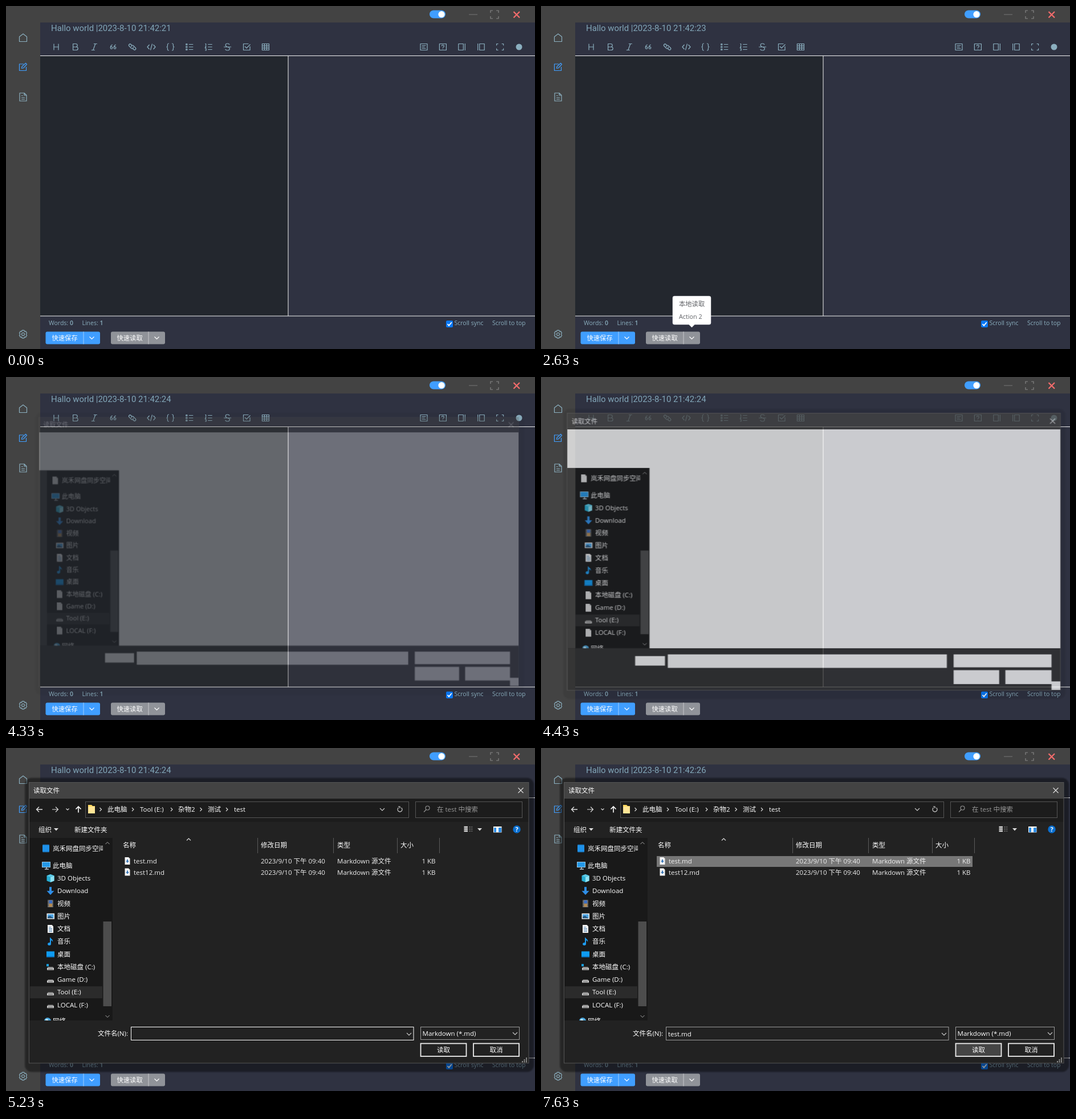
An HTML page for the animation above (8000 ms loop, 928 by 603 pixels).

```html
<!DOCTYPE html>
<html lang="zh-CN">
<head>
<meta charset="utf-8">
<title>Editor</title>
<style>
html, body { margin: 0; width: 100%; height: 100%; overflow: hidden; background: #2f3241; }
svg { display: block; }
text { white-space: pre; }
#stage { font: 11.5px 'Open Sans', 'Noto Sans CJK SC', 'Noto Sans CJK', sans-serif; }
.title { font: 14.93px Roboto, sans-serif; fill: #82a6b8; }
.foot { font-size: 10.5px; fill: #8bafbf; }
.btn { font-size: 11.3px; font-weight: 500; fill: #fff; }
.line { fill: none; stroke: #8bafbf; stroke-width: 1.2; stroke-linejoin: round; }
.thin { fill: none; stroke: #ddd; stroke-width: 1.1; }
.box { fill: none; stroke: #555; }
.mid { text-anchor: middle; }
.end { text-anchor: end; }

#stage [class*="a-"] { animation: 8s step-end infinite; }
#stage .a-clock { animation-name: clock; }
#stage .a-main { animation-name: main; animation-timing-function: linear; }
#stage .a-arrow { animation-name: arrow; animation-timing-function: linear; }
#stage .a-menu { animation-name: menu; animation-timing-function: linear; }
#stage .a-item { animation-name: item; }
#stage .a-itemtext { animation-name: itemtext; }
#stage .a-dialog { animation-name: dialog; transform-origin: 479px 307px; }
#stage .a-shadow { animation-name: shadow; }
#stage .a-body { animation-name: body; }
#stage .a-early { animation-name: early; }
#stage .a-late { animation-name: late; }
#stage .a-folder { animation-name: folder; }
#stage .a-row { animation-name: row; }
#stage .a-caret { animation-name: caret; }
#stage .a-name { animation-name: name; }
#stage .a-field { animation-name: field; }
#stage .a-filter { animation-name: filter; }
#stage .a-open { animation-name: open; animation-timing-function: linear; }

@keyframes clock {
  0% { transform: none; }
  15.3% { transform: translateY(-30px); }
  32.8% { transform: translateY(-60px); }
  50.3% { transform: translateY(-90px); }
  67.8% { transform: translateY(-120px); }
  85.3%, 100% { transform: translateY(-150px); }
}
@keyframes main {
  0%, 12.8% { fill: #909399; }
  14.1%, 22.8% { fill: #a6a9ad; }
  24.1%, 100% { fill: #909399; }
}
@keyframes arrow {
  0%, 9.1% { fill: #909399; }
  10.3%, 12.8% { fill: #a6a9ad; }
  14.1%, 22.8% { fill: #909399; }
  24.1%, 31.5% { fill: #a6a9ad; }
  32.8%, 100% { fill: #909399; }
}
@keyframes menu {
  0%, 12% { opacity: 0; }
  15% { opacity: .6; }
  17.8%, 26% { opacity: 0; }
  31.6%, 43.5% { opacity: 1; }
  47.8%, 100% { opacity: 0; }
}
@keyframes item { 0% { fill: #fff; } 41.6%, 100% { fill: #ecf5ff; } }
@keyframes itemtext { 0% { fill: #606266; } 41.6%, 100% { fill: #409eff; } }
@keyframes dialog {
  0% { opacity: 0; transform: scale(.95); }
  54.1% { opacity: .3; transform: scale(.96); }
  55.3% { opacity: .75; transform: scale(.987); }
  56.6% { opacity: .95; transform: scale(.997); }
  57.8%, 100% { opacity: 1; transform: none; }
}
@keyframes shadow { 0% { opacity: .12; } 56.6% { opacity: .3; } 57.8%, 100% { opacity: .42; } }
@keyframes body { 0% { fill: #313131; } 56.6%, 100% { fill: #222; } }
@keyframes early { 0% { opacity: 1; } 56.6%, 100% { opacity: 0; } }
@keyframes late { 0% { opacity: 0; } 56.6%, 100% { opacity: 1; } }
@keyframes folder { 0% { fill: #777; } 65.3%, 100% { fill: #fff; } }
@keyframes row { 0% { fill: #4d4d4d00; } 69.1% { fill: #4d4d4d; } 77.8%, 100% { fill: #777; } }
@keyframes caret { 0% { opacity: 0; } 67.8% { opacity: 1; } 75.3%, 100% { opacity: 0; } }
@keyframes name { 0% { opacity: 0; } 77.8%, 100% { opacity: 1; } }
@keyframes field { 0% { stroke: #fff; } 85.3% { stroke: #c4c4c4; } 95.3%, 100% { stroke: #9b9b9b; } }
@keyframes filter { 0% { stroke: #9b9b9b; } 89.1% { stroke: #ccc; } 91.6%, 100% { stroke: #9b9b9b; } }
@keyframes open { 0%, 90.3% { fill: #222; } 92.8%, 100% { fill: #454545; } }
</style>
</head>
<body>
<svg id="stage" width="928" height="603" viewBox="0 0 928 603">
  <defs>
    <clipPath id="titleline"><rect x="70" y="30" width="300" height="20"/></clipPath>
    <clipPath id="tree"><rect x="41" y="158" width="129" height="321"/></clipPath>
    <filter id="soft" x="-5%" y="-5%" width="110%" height="110%"><feGaussianBlur stdDeviation="1.2"/></filter>
    <g id="down"><path d="M-4-2L0 2 4-2" fill="none" stroke="currentColor" stroke-width="1.1"/></g>
    <g id="next"><path d="M-1.5-3L1.5 0-1.5 3" class="thin"/></g>
    <g id="md"><path d="M-4.5-6.5H2L4.5-4V6.5H-4.5z" fill="#f4f4f4"/><path d="M-1-2.5H1V0H3L0 3.5-3 0H-1z" fill="#3a78b8"/></g>
    <g id="doc"><path d="M-5-7H2L5-4V7H-5z" fill="#ddd"/><path d="M2-7V-4H5" fill="#aaa"/></g>
    <g id="drive"><path d="M-4 0H4L6 2H-6z" fill="#888"/><path d="M-6 2H6V5.500H-6z" fill="#ddd"/><path d="M-4.500 3.800H4.500" stroke="#444"/></g>
    <g id="sysdrive"><use href="#drive"/><rect x="-7" y="-5" width="4" height="4" fill="#19a5ee"/></g>
    <g id="cloud"><rect x="-6" y="-6.5" width="12" height="13" rx="1" fill="#1e90e8"/></g>
    <g id="pc"><rect x="-6.5" y="-6" width="14" height="9" fill="#2499e8" stroke="#9ccbea"/><path d="M-2 6.5H5M1 3V6" stroke="#b9c6d0" stroke-width="1.5"/></g>
    <g id="cube"><path d="M0-7L6.5-4.5V4.5L0 7-6.5 4.5V-4.5z" fill="#27aed3"/><path d="M0-2L6.5-4.5V4.5L0 7z" fill="#8fe2f3"/><path d="M0-7L6.5-4.5 0-2-6.5-4.5z" fill="#5cc8e4"/></g>
    <g id="save"><path d="M-2-7H2V0H6.5L0 7-6.5 0H-2z" fill="#2f8fe8"/></g>
    <g id="film"><path d="M-5-6.5H5V6.5H-5z" fill="#777"/><path d="M-2.5-5.5H3V-.5H-2.5z" fill="#3d6fc4"/><path d="M-2.5.5H3V5.5H-2.5z" fill="#b58b52"/><path d="M-4-6V6.5M4.2-6V6.5" stroke="#222" stroke-dasharray="1.5 1.5"/></g>
    <g id="photo"><path d="M-6.5-5H7V5H-6.5z" fill="#eee"/><path d="M-5-3.5H5.5V3.5H-5z" fill="#4ea6e6"/><path d="M-5 3.5V1L-1-1 5.5 3.5z" fill="#26577f"/></g>
    <g id="page"><path d="M-5-7H2.5L5-4.5V7H-5z" fill="#f2f2f2"/><path d="M-3-3H1M-3-.5H3M-3 2H3M-3 4.5H3" stroke="#4b80b0"/></g>
    <g id="note"><path d="M0-7C1-4 5-4 4 1 3.5-1.5 2-2 1-2V4A3 2.5 0 1 1-1 2V-7z" fill="#1e9cf0"/></g>
    <g id="desk"><path d="M-7-5H7V5.5H-7z" fill="#0f9bf2"/><path d="M-7 3.5H7V5.5H-7z" fill="#0a75c2"/></g>
    <g id="globe"><circle r="6" fill="#4aa7dd"/><path d="M-4-3Q0-5 1-2T-3 1z" fill="#c5e6f5"/></g>
  </defs>

  <!-- window frame -->
  <rect width="928" height="603" fill="#434343"/>
  <rect x="60" y="29" width="868" height="574" fill="#2f3241"/>
  <rect x="743" y="7.5" width="28" height="14" rx="7" fill="#409eff"/>
  <circle cx="764" cy="14.7" r="5.6" fill="#fff"/>
  <path d="M812 15H827" stroke="#777"/>
  <path d="M850 12V8H854M860 8H864V12M864 18V22H860M854 22H850V18" fill="none" stroke="#858585" stroke-width="1.2"/>
  <path d="M890.5 10L901 20.5M901 10L890.5 20.5" stroke="#f56c6c" stroke-width="2.2"/>

  <g class="line">
    <path transform="translate(30 56)" d="M-6.5 6.5V-2L0-7 6.5-2V6.5z"/>
    <path transform="translate(30 107)" style="stroke:#409eff" d="M1-5H-6.5V6.5H5.5V0M-2.5 2.5L-2-.5 4.5-6.5 6.5-4.5.5 2z"/>
    <path transform="translate(30 160)" d="M-6-7H2L6-3V7H-6zM2-7V-3H6M-3-2.5H-.5M-3 1H3M-3 4H3"/>
    <g transform="translate(30 577)"><path d="M-1.8-6.8H1.8L2.5-4.8 4.7-5.1 6.6-2 5.2 0 6.6 2 4.7 5.1 2.5 4.8 1.8 6.8H-1.8L-2.5 4.8-4.7 5.1-6.6 2-5.2 0-6.6-2-4.7-5.1-2.5-4.8z"/><circle r="2.5"/></g>
  </g>

  <g class="title" clip-path="url(#titleline)"><g class="a-clock" id="clock"></g></g>

  <!-- toolbar -->
  <g class="line" id="tools"></g>
  <circle cx="900" cy="72" r="5.5" fill="#8bafbf"/>

  <rect x="60" y="88" width="435" height="457" fill="#23272e"/>
  <path d="M60 87.5H928M60 545H928M495 88V545" stroke="#f2f2f2"/>

  <!-- footer -->
  <g class="foot">
    <text x="75" y="561">Words: <tspan font-weight="600">0</tspan></text>
    <text x="133.5" y="561">Lines: <tspan font-weight="600">1</tspan></text>
    <text x="786.5" y="561">Scroll sync</text>
    <text x="853" y="561">Scroll to top</text>
  </g>
  <rect x="772" y="553" width="12" height="12" rx="2" fill="#0a78f5"/>
  <path d="M774.5 559L777 561.8 781.8 556" fill="none" stroke="#fff" stroke-width="1.8"/>

  <g class="btn" color="#fff">
    <rect x="69.5" y="572.5" width="95.5" height="22" rx="3" fill="#409eff"/>
    <path d="M136 572.5V594.5" stroke="#a0cfff"/>
    <text x="80.5" y="587.5">快速保存</text>
    <use href="#down" x="150.5" y="583.5"/>
    <path class="a-main" d="M187 572.5H250V594.5H187Q184 594.5 184 591.5V575.5Q184 572.5 187 572.5z"/>
    <path class="a-arrow" d="M250 572.5H276Q279 572.5 279 575.5V591.5Q279 594.5 276 594.5H250z"/>
    <path d="M250 572.5V594.5" stroke="#c8c9cc"/>
    <text x="194.5" y="587.5">快速读取</text>
    <use href="#down" x="264.5" y="583.5"/>
  </g>

  <g class="a-menu">
    <path d="M234 510H295Q298 510 298 513V557Q298 560 295 560H269.5L264.5 565 259.5 560H234Q231 560 231 557V513Q231 510 234 510z" fill="#fff" stroke="#e4e7ed" stroke-width=".5"/>
    <rect class="a-item" x="231" y="513" width="67" height="22"/>
    <text class="a-itemtext" x="242" y="528" font-size="11.3">本地读取</text>
    <text x="242" y="550" font-size="10.8" fill="#606266">Action 2</text>
  </g>

  <!-- file dialog -->
  <g class="a-dialog" fill="#fff">
    <rect class="a-shadow" x="33" y="52.5" width="893" height="517" rx="12" fill="#000" filter="url(#soft)"/>
    <rect class="a-body" x="41" y="61" width="876" height="493"/>
    <rect x="41" y="61" width="876" height="28" fill="#434343"/>
    <rect x="41" y="89" width="876" height="41" fill="#1c1c1c"/>
    <rect x="40.5" y="60.5" width="876.5" height="493.5" class="box"/>
    <text x="48" y="79">读取文件</text>
    <path d="M898.5 70L907.5 79M907.5 70L898.5 79" class="thin"/>

    <rect x="41" y="158" width="146" height="321" fill="#191919"/>
    <rect x="42" y="419" width="127" height="21" fill="#2b2b2b"/>
    <rect class="a-early" x="41" y="158" width="14" height="321" fill="#3c3c3c"/>
    <g clip-path="url(#tree)" id="nodes"></g>
    <rect x="170.5" y="305" width="14.5" height="149" fill="#4d4d4d"/>
    <path d="M174.5 169L178 165.5 181.5 169M174.5 470L178 473.5 181.5 470" fill="none" stroke="#aaa"/>

    <path class="a-early" d="M41 89H917V158H41zM186.5 158H917V479H186.5zM161 493H214V510H161zM219 490H715V514H219zM727 490H901V513H727zM727 518H808V543H727zM819 518H901V543H819zM901 538H917V553H901z"/>

    <g class="a-late" color="#ccc">
      <g class="thin">
        <path d="M64 108H53.5M58 103.5L53.5 108 58 112.5" stroke-width="1.4"/>
        <path d="M81 108H91.5M87 103.5L91.5 108 87 112.5"/>
        <path d="M105.5 106.5L108 109 110.5 106.5"/>
        <path d="M127 113.5V103M122.5 107.5L127 103 131.5 107.5" style="stroke:#fff;stroke-width:1.6"/>
        <path d="M688.5 105A4 4 0 1 0 693.5 105M688 103H691V106"/>
        <g style="stroke:#999"><circle cx="739.5" cy="105.5" r="3.5"/><path d="M737 108.5L733 112.5"/></g>
        <path d="M317 162.5L320.5 159 324 162.5"/>
      </g>
      <rect x="139.5" y="94.5" width="567" height="28" class="box"/>
      <rect x="718.5" y="94.5" width="187" height="28" class="box"/>
      <path d="M144 100H150L152 102H156V115H144z" fill="#ffd75e"/>
      <path d="M144 103H156V115H144z" fill="#ffe596"/>
      <use href="#next" x="166" y="108"/><use href="#next" x="222.5" y="108"/><use href="#next" x="290.5" y="108"/><use href="#next" x="342" y="108"/><use href="#next" x="387.5" y="108"/>
      <text x="178" y="112">此电脑</text>
      <text x="235" y="112">Tool (E:)</text>
      <text x="302" y="112">杂物2</text>
      <text x="354" y="112">测试</text>
      <text x="400" y="112">test</text>
      <use href="#down" x="660" y="108"/>
      <text x="756" y="112" fill="#999">在 test 中搜索</text>

      <text x="57" y="147.5">组织</text>
      <path d="M84 141H92L88 145.5zM827 141H835L831 145.5z" fill="#ddd"/>
      <text class="a-folder" x="120" y="147.5">新建文件夹</text>
      <path d="M803.5 139H810M803.5 142.5H810M803.5 146H810" stroke="#ddd" stroke-width="2.4"/>
      <path d="M812 139H818.5M812 142.5H818.5M812 146H818.5" stroke="#888" stroke-dasharray="3 .8"/>
      <rect x="855" y="138" width="14.5" height="10.5"/>
      <path d="M856 140H860V148H856zM864 140H869V148H864z" fill="#2f8fe8"/>
      <circle cx="896" cy="143" r="6.7" fill="#0a6fd0"/>
      <text x="896" y="147" class="mid" font-weight="700" font-size="11">?</text>

      <path d="M441.5 158V185M574.5 158V185M686.5 158V185M760.5 158V185" stroke="#5a5a5a"/>
      <text x="205" y="175">名称</text>
      <text x="447" y="175">修改日期</text>
      <text x="581" y="175">类型</text>
      <text x="692" y="175">大小</text>
      <rect class="a-row" x="203" y="190" width="554" height="19"/>
      <g id="files" fill="#eee"></g>

      <text x="214" y="506" class="end">文件名(N):</text>
      <rect class="a-field" x="219.5" y="490.5" width="495.5" height="23" fill="#222"/>
      <rect class="a-caret" x="223" y="494" width="1" height="16"/>
      <text class="a-name" x="223" y="506.5">test.md</text>
      <use href="#down" x="707" y="503"/>
      <rect class="a-filter" x="727.5" y="490.5" width="173" height="22" fill="#222"/>
      <text x="730.5" y="506">Markdown (*.md)</text>
      <use href="#down" x="893" y="502"/>
      <rect class="a-open" x="727.5" y="519.5" width="80" height="22.5" stroke="#eee" stroke-width="1.8"/>
      <rect x="820" y="519.5" width="80" height="22.5" fill="none" stroke="#eee" stroke-width="1.8"/>
      <text x="767.5" y="535" class="mid">读取</text>
      <text x="860" y="535" class="mid">取消</text>
      <path d="M912 545.5H914M908.5 548.5H910.5M912 548.5H914M905 551.5H907M908.5 551.5H910.5M912 551.5H914" stroke="#aaa" stroke-width="2"/>
    </g>
  </g>
</svg>
<script>
const fill = (id, list, draw) => {
  document.getElementById(id).innerHTML = list.map(draw).join('');
};

fill('clock', [1, 2, 3, 4, 5, 6], (n, i) =>
  `<text x="79" y="${43.5 + 30 * i}">Hallo world |2023-8-10 21:42:2${n}</text>`);

const left = [
  'M-4-5.5V5.5M4-5.5V5.5M-4 0H4',
  'M-3.8-5.5H1a2.75 2.75 0 0 1 0 5.5H-3.8zM-3.8 0H2a2.75 2.75 0 0 1 0 5.5H-3.8z',
  'M-1-5.5H5M-5 5.5H1M2-5.5L-2 5.5',
  'M-1.5-4Q-5-2.5-5 1.5a1.8 1.8 0 1 0 1.8-1.8H-4.5M4.5-4Q1-2.5 1 1.5a1.8 1.8 0 1 0 1.8-1.8H1.5',
  'M-1-3L-2.5-4.5a2 2 0 0 0-3 3L-1.5 2.5a2 2 0 0 0 3-2.5M1 3L2.5 4.5a2 2 0 0 0 3-3L1.5-2.5a2 2 0 0 0-3 2.5',
  'M-3.5-4L-7 0-3.5 4M3.5-4L7 0 3.5 4M1.5-5.5L-1.5 5.5',
  'M-2.5-6H-3.5Q-5-6-5-4V-2Q-5 0-6.5 0-5 0-5 2V4Q-5 6-3.5 6H-2.5M2.5-6H3.5Q5-6 5-4V-2Q5 0 6.5 0 5 0 5 2V4Q5 6 3.5 6H2.5',
  'M-6-5.5H-4V-3.5H-6zM-6-1H-4V1H-6zM-6 3.5H-4V5.5H-6zM-1-4.5H6.5M-1 0H6.5M-1 4.5H6.5',
  'M-6-5.5H-4.5V-2.5M-6-1.5H-4.5V0L-6 1.5H-4M-6 3H-4V6H-6M-1-4.5H6.5M-1 0H6.5M-1 4.5H6.5',
  'M-6.5 0H6.5M3.5-4Q2.5-6 0-6-3.5-6-3.5-3.2-3.5-1 0 0 3.8 1 3.8 3 3.5 6 0 6-3 6-4 4',
  'M6-1V5.5H-5.5V-5.5H3.5M-3-1L0 2 6.5-4.5',
  'M-6-5.5H6V5.5H-6zM-6-1.8H6M-6 1.8H6M-2-5.5V5.5M2-5.5V5.5'
];
const right = [
  'M-6-5.5H6V5.5H-6zM-3.5-2.5H3.5M-3.5 0H1.5M-3.5 2.5H3.5',
  'M-6-5.5H6V5.5H-6zM-2-1.5Q-2-3.3 0-3.3T2-1.5 0 .8V1.5M0 2.8V3.8',
  'M-6-5.5H2.5V5.5H-6zM5.5-6V6',
  'M6-5.5H-2.5V5.5H6zM-5.5-6V6',
  'M-6-2.5V-5.5H-3M3-5.5H6V-2.5M6 2.5V5.5H3M-3 5.5H-6V2.5'
];
fill('tools', [...left, ...right], (d, i) => {
  const x = i < left.length ? 88 + 33.4 * i : 733 + 33.4 * (i - left.length);
  return `<path transform="translate(${x} 72)" d="${d}"/>`;
});

const nodes = [
  ['cloud', '岚禾网盘同步空间', 176.5, 1], ['pc', '此电脑', 206.5],
  ['cube', '3D Objects'], ['save', 'Download'], ['film', '视频'], ['photo', '图片'],
  ['page', '文档'], ['note', '音乐'], ['desk', '桌面'],
  ['sysdrive', '本地磁盘 (C:)', 0, 1], ['drive', 'Game (D:)', 0, 1],
  ['drive', 'Tool (E:)'], ['drive', 'LOCAL (F:)', 0, 1], ['globe', '网络', 480]
];
fill('nodes', nodes, ([icon, name, top, lazy], i) => {
  const x = top ? 82 : 90, y = top || 229 + 22.25 * (i - 2);
  const use = (id, cls) => `<use href="#${id}" x="${x - (icon === 'globe' ? 9 : 12)}" y="${y}" class="${cls}"/>`;
  return (lazy ? use('doc', 'a-early') + use(icon, 'a-late') : use(icon, '')) +
    `<text x="${x}" y="${y + 4}">${name}</text>`;
});

fill('files', ['test.md', 'test12.md'], (name, i) => {
  const y = 203 + 19.5 * i;
  return `<use href="#md" x="213" y="${y - 4.5}"/><text x="224" y="${y}">${name}</text>
    <text x="447" y="${y}">2023/9/10 下午 09:40</text><text x="581" y="${y}">Markdown 源文件</text>
    <text x="753.5" y="${y}" class="end">1 KB</text>`;
});
</script>
</body>
</html>
```
